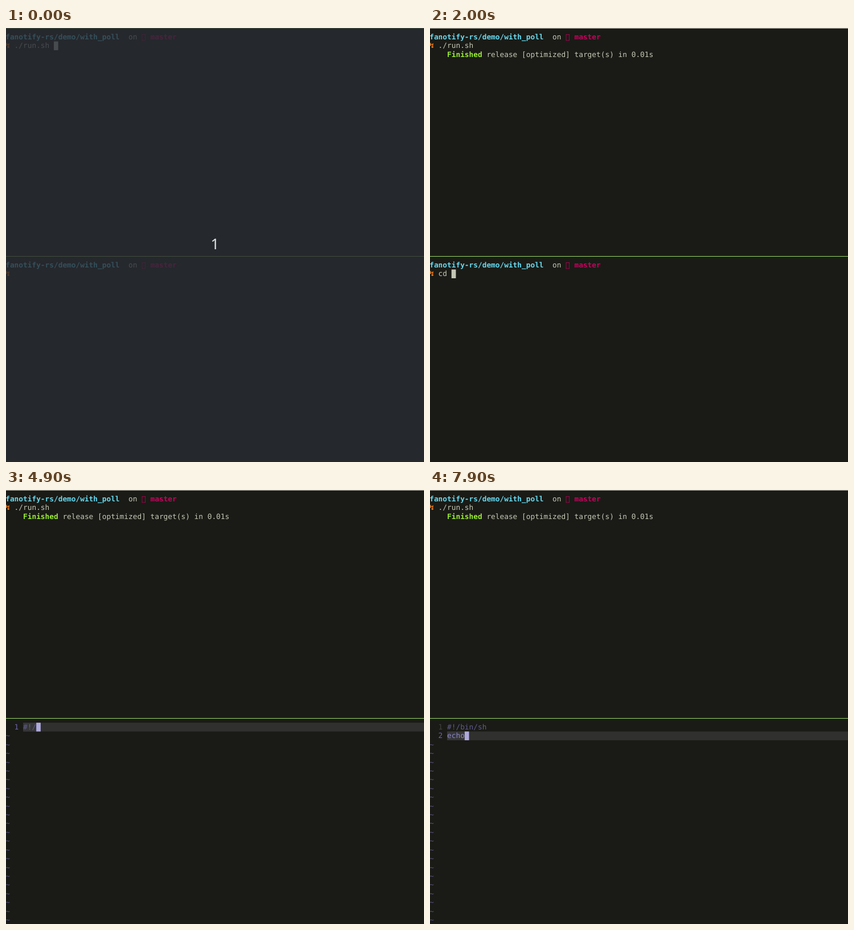
An HTML page with a canvas that plays this animation: 734x763 px, repeating every 8 s.

```html
<!DOCTYPE html>
<html lang="en">
<head>
<meta charset="utf-8">
<title>Terminal session</title>
<style>
  html, body { margin: 0; width: 100%; height: 100%; overflow: hidden; background: #1a1b16; }
  canvas { display: block; }
</style>
</head>
<body>
<canvas id="stage" width="734" height="763"></canvas>
<script>
const ctx = document.getElementById('stage').getContext('2d');
const W = 734, H = 763, LOOP = 8000;
const CELL = 7.706, LINE = 15.42, FONT = 12.8;
const DIVIDER = 26, PANE = 27, LAST_ROW = 49, GUTTER = 4;

const C = {
  bg: '#1a1b16', text: '#c5c7b5', path: '#66d9ef', branch: '#c8005f',
  prompt: '#f4801f', done: '#9aed34', active: '#98d860', idle: '#b0b0a8',
  line: '#30302e', typed: '#363637', cursor: '#aea9dc',
  number: '#6c64a4', dimNumber: '#42423e', tilde: '#58547f',
  comment: '#5e5b8c', keyword: '#8a86c8'
};

// Each entry: [start time, what is typed from then on]
const cdKeys = [[1200, ''], [1500, 'c'], [1700, 'cd'], [2000, 'cd '], [2100, 'cd t'], [2200, 'cd tmp']];
const vimKeys = [[2500, ''], [2600, 'v'], [3000, 'vi'], [3100, 'vim '], [3200, 'vim a.'],
  [3400, 'vim a.s'], [3500, 'vim a.sh']];
const shebangKeys = [[4000, ''], [4600, '#'], [4800, '#!'], [4900, '#!/'], [6300, '#!/b'],
  [6400, '#!/bi'], [6500, '#!/bin'], [7000, '#!/bin/s'], [7200, '#!/bin/sh']];
const echoKeys = [[7500, ''], [7600, 'e'], [7800, 'ech'], [7900, 'echo']];

const typedAt = (keys, t) => keys.reduce((now, [start, text]) => t >= start ? text : now, '');
const colX = col => col * CELL - 0.8;
const rowY = row => 0.5 + (row - 0.5) * LINE;

function rect(x, y, w, h, color) {
  ctx.fillStyle = color;
  ctx.fillRect(x, y, w, h);
}

function fillCells(col, row, count, color) {
  rect(colX(col), rowY(row), count * CELL, LINE, color);
}

function write(col, row, text, color, bold = false) {
  ctx.font = `${bold ? 'bold ' : ''}${FONT}px "DejaVu Sans Mono", monospace`;
  ctx.fillStyle = color;
  [...text].forEach((ch, i) => ctx.fillText(ch, colX(col + i), rowY(row) + 11.7));
}

function prompt(row, path, command, focused) {
  const end = path.length;
  write(0, row, path, C.path, true);
  write(end + 2, row, 'on', C.text);
  write(end + 5, row, '\ue0a0 master', C.branch, true);
  write(0, row + 1, '↯', C.prompt, true);
  write(2, row + 1, command, C.text);
  if (focused) fillCells(2 + command.length, row + 1, 1, C.text);
}

function topPane(t) {
  prompt(1, 'fanotify-rs/demo/with_poll', './run.sh ', t < 500);
  if (t < 500) return;
  write(4, 3, 'Finished', C.done, true);
  write(13, 3, 'release [optimized] target(s) in 0.01s', C.text);
  if (t < 1200) fillCells(0, 4, 1, C.text);
}

function shell(t) {
  prompt(PANE, 'fanotify-rs/demo/with_poll', typedAt(cdKeys, t), t >= 1200 && t < 2500);
  if (t >= 2500) prompt(PANE + 2, 'demo/with_poll/tmp', typedAt(vimKeys, t), true);
}

function editorLine(row, number, text, color, current) {
  if (current) {
    const x = colX(GUTTER);
    rect(x, rowY(row), W - x, LINE, C.line);
    fillCells(GUTTER, row, text.length, C.typed);
    fillCells(GUTTER + text.length, row, 1, C.cursor);
  }
  write(2, row, number, current ? C.number : C.dimNumber);
  write(GUTTER, row, text, color);
}

function editor(t) {
  const second = t >= 7500;
  editorLine(PANE, '1', typedAt(shebangKeys, t), C.comment, !second);
  if (second) {
    const word = typedAt(echoKeys, t);
    editorLine(PANE + 1, '2', word, word === 'echo' ? C.keyword : C.text, true);
  }
  for (let row = PANE + (second ? 2 : 1); row <= LAST_ROW; row++) write(0, row, '~', C.tilde);
}

function countdown() {
  rect(0, 0, W, H, 'rgba(40, 44, 52, 0.8)');
  ctx.font = '26px "Noto Sans", sans-serif';
  ctx.textAlign = 'center';
  ctx.fillStyle = '#e4e5e6';
  ctx.fillText('1', W / 2, 389);
  ctx.textAlign = 'left';
}

function draw(t) {
  rect(0, 0, W, H, C.bg);
  topPane(t);
  if (t < 3700) shell(t);
  else if (t >= 4000) editor(t);
  rect(0, 0, W, 1, t < 1200 ? C.active : C.idle);
  rect(0, Math.floor(0.5 + DIVIDER * LINE), W, 1, C.active);
  if (t < 200) countdown();
}

const start = performance.now();
function tick() {
  draw((performance.now() - start) % LOOP);
  requestAnimationFrame(tick);
}
ctx.textRendering = 'geometricPrecision';
tick();
</script>
</body>
</html>
```
